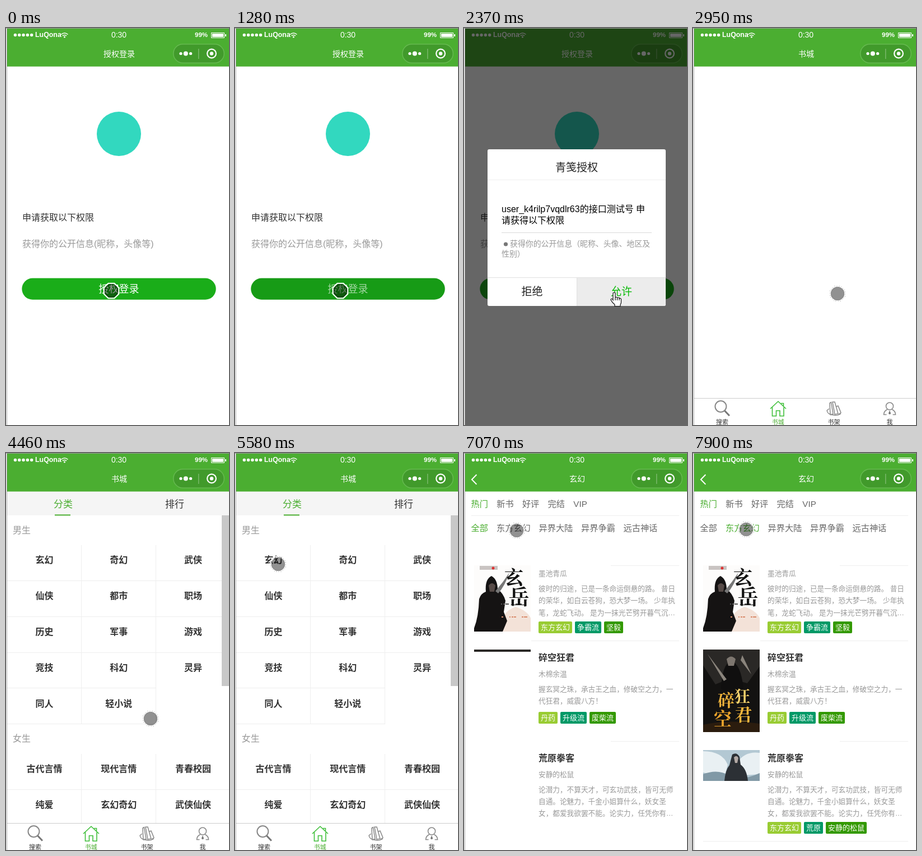
These frames come from a looping animation (398 px wide and 707 px high, 8000 ms). An HTML page with a canvas:

```html
<!DOCTYPE html>
<html lang="zh">
<head>
<meta charset="utf-8">
<style>
html, body { margin: 0; width: 100%; height: 100%; overflow: hidden; background: #fff; }
canvas { display: block; }
</style>
</head>
<body>
<canvas id="stage" width="398" height="707"></canvas>
<script>
const c = document.getElementById('stage').getContext('2d');
const LOOP = 8000;
const GREEN = '#4bae31';
const FONT = '"Liberation Sans", "Noto Sans CJK SC", "Noto Sans CJK", sans-serif';
const BRUSH = '"Noto Serif CJK SC", "Noto Sans CJK SC", "Noto Sans CJK", serif';

// ---- helpers ----
// latest entry of [[time, ...values], ...] that has started
const stepAt = (steps, t) => steps.filter(s => s[0] <= t).pop();

function rect(x, y, w, h, color) {
  c.fillStyle = color;
  c.fillRect(x, y, w, h);
}
function round(x, y, w, h, r, color) {
  c.fillStyle = color;
  c.beginPath();
  c.roundRect(x, y, w, h, r);
  c.fill();
}
function disc(x, y, r, color) {
  c.fillStyle = color;
  c.beginPath();
  c.arc(x, y, r, 0, 7);
  c.fill();
}
function stroke(d, color, width = 1) {
  c.strokeStyle = color;
  c.lineWidth = width;
  c.stroke(new Path2D(d));
}
function fill(d, color) {
  c.fillStyle = color;
  c.fill(new Path2D(d));
}
// y is the middle of the glyphs
function text(s, x, y, size, color, align = 'left', weight = '', family = FONT) {
  c.font = `${weight} ${size}px ${family}`;
  c.textAlign = align;
  c.fillStyle = color;
  c.fillText(s, x, y + size * .37);
}
function clipped(x, y, w, h, draw) {
  c.save();
  c.beginPath();
  c.rect(x, y, w, h);
  c.clip();
  draw();
  c.restore();
}

// ---- navigation bar ----
function navBar(title, back, alpha) {
  rect(2, 1, 396, 67.6, GREEN);
  for (let i = 0; i < 5; i++) disc(16.5 + i * 7.3, 12.5, 2.7, '#fff');
  text('LuQona', 52, 11.5, 12.4, '#fff', 'left', 'bold');
  stroke('M98.5 11.5q6-5 12 0M100.8 14q3.7-3 7.4 0', '#fff', 1.6);
  disc(104.5, 16, 1.5, '#fff');
  text('0:30', 201.5, 12, 14, '#fff', 'center');
  text('99%', 337, 12, 11.5, '#fff', 'left', 'bold');
  stroke('M366.5 8.5h23v9h-23z', '#fff');
  rect(368, 10, 20, 6, '#fff');
  rect(391, 11, 2, 4, '#fff');

  c.globalAlpha = alpha;
  text(title, 202, 46, 14, '#fff', 'center', '500');
  if (back) stroke('M22.5 38.5L14 47.2l8.5 8.7', '#fff', 2);
  c.globalAlpha = 1;

  round(298, 28, 92, 35, 17.5, 'rgba(255,255,255,.15)');
  round(299.5, 29.5, 89, 32, 16, '#419a2b');
  disc(312, 45.5, 2.6, '#fff');
  disc(320.8, 45.5, 4, '#fff');
  disc(329.6, 45.5, 2.6, '#fff');
  rect(343, 37, 1.5, 18, 'rgba(255,255,255,.3)');
  disc(367, 45.5, 9, '#fff');
  disc(367, 45.5, 6.8, '#419a2b');
  disc(367, 45.5, 3.2, '#fff');
}

// ---- login page ----
function loginPage(pressed) {
  disc(201.5, 188.5, 39.5, '#32d8bf');
  text('申请获取以下权限', 29, 337, 16, '#333');
  text('获得你的公开信息(昵称，头像等)', 29, 384.5, 16, '#999');
  round(28.4, 445.6, 346.3, 38.2, 19, pressed ? '#179b16' : '#1aad19');
  text('授权登录', 201.5, 464.5, 18, pressed ? 'rgba(255,255,255,.6)' : '#fff', 'center');
}

function dialog(alpha, allowPressed) {
  c.globalAlpha = alpha;
  rect(2, 1, 396, 706, 'rgba(0,0,0,.6)');
  round(42, 216, 318, 279, 3, '#fff');
  text('青笺授权', 201, 248, 19, '#222', 'center');
  rect(42, 270, 318, 1, '#eee');
  text('user_k4rilp7vqdlr63的接口测试号 申', 67, 322.5, 16, '#000');
  text('请获得以下权限', 67, 342.5, 16, '#000');
  rect(67, 364, 268, 1, '#d9d9d9');
  disc(74.5, 385, 3.6, '#777');
  text('获得你的公开信息（昵称、头像、地区及', 82, 383.5, 13.9, '#999');
  text('性别）', 67, 401.5, 13.9, '#999');
  if (allowPressed) round(201, 444, 159, 51, [0, 0, 3, 0], '#ececec');
  rect(42, 444, 318, 1, '#e0e0e0');
  rect(201, 444, 1, 51, '#e0e0e0');
  text('拒绝', 121.5, 469, 19, '#222', 'center');
  text('允许', 281, 469, 19, '#09bb07', 'center');
  c.globalAlpha = 1;
}

// ---- store page ----
function tabBar(homeLoaded) {
  rect(2, 659, 396, 48, '#fff');
  rect(2, 659, 396, 1, '#ccc');
  stroke('M59.500 674a10 10 0 1 1-20 0 10 10 0 1 1 20 0', '#888', 2);
  stroke('M56.500 681.500l8.500 9', '#777', 3);
  if (homeLoaded) stroke('M138 678l14-13 14 13M141.5 675.5v15.5h7v-9.500h6.500v9.500h7v-15.500M157 668.500h4.500v5', '#3fbf3a', 1.6);
  stroke('M244 668l2.500-1.500 3.500 21-5 1zM249 666h4l6 21-6 1zM256 674l3-1 5 12-4 3M239 681q1 7 10 8M239 681l4-3M249 689q9 2 15-2', '#888', 1.5);
  stroke('M357.500 673.500a6.500 6.500 0 1 1-13 0 6.500 6.500 0 1 1 13 0M346.500 679.500q-6 3-6 9h5M355.500 679.500q6 3 6 9h-5', '#888', 1.6);
  fill('M351 681l2 5a2 2 0 1 1-4 0z', '#777');
  ['搜索', '书城', '书架', '我'].forEach((s, i) =>
    text(s, 52 + i * 99.7, 701.5, 11, i === 1 ? GREEN : '#333', 'center'));
}

function genreGrid(names, top) {
  names.forEach((name, i) => {
    const col = i % 3, x = 2 + col * 132.7, y = top + Math.floor(i / 3) * 63.8;
    text(name, x + 66.5, y + 26.5, 16, '#333', 'center', 'bold');
    if (col < 2) rect(Math.round(x + 132), y, 1, 63.8, '#eee');
    if (col < 2 || i + 3 < names.length) rect(x, Math.round(y + 63), 133, 1, '#eee');
  });
}
const BOYS = '玄幻 奇幻 武侠 仙侠 都市 职场 历史 军事 游戏 竞技 科幻 灵异 同人 轻小说'.split(' ');
const GIRLS = '古代言情 现代言情 青春校园 纯爱 玄幻奇幻 武侠仙侠 科幻 悬疑 同人'.split(' ');

function storePage(t) {
  if (t >= 4190) {
    rect(2, 68, 396, 43, '#f5f5f5');
    text('分类', 102, 90.5, 17, GREEN, 'center');
    text('排行', 301, 90.5, 17, '#333', 'center');
    rect(87, 109.5, 28, 2, GREEN);
    text('男生', 12, 137.5, 16, '#999');
  }
  if (t >= 4460) clipped(2, 111, 396, t < 5890 ? 548 : 535, () => {
    genreGrid(BOYS, 164);
    text('女生', 12, 508.5, 16, '#999');
    genreGrid(GIRLS, 536);
    rect(385, 111, 13, 304, '#c8c8c8');
  });
  if (t < 5890) tabBar(t >= 2950);
}

// ---- book list page ----
function coverInk() {
  rect(18, 200, 101, 118, '#fdfcfb');
  fill('M62 318q4-36 30-44 20 6 27 20v24z', '#f3e2d8');
  fill('M18 318v-6q8-20 9-52 3-10 12-13-2-22 10-28 11 6 11 24 10 6 14 20l-3 20 6 16-8 19z', '#151313');
  fill('M44 236q6-8 12 0l-2 11h-8z', '#574b48');
  fill('M56 246q14-16 25-33-8 24-20 37z', '#777');
  for (let i = 0; i < 14; i++)
    rect(66 + i * 37 % 48, 268 + i * 23 % 46, 2 + i % 3, 2, i % 2 ? '#d98a6a' : '#555');
  rect(28, 201, 32, 7, '#c9c4c2');
  disc(52, 205, 2.5, '#d33');
  text('玄', 89, 221, 34, '#111', 'center', '900', BRUSH);
  text('岳', 98, 256, 37, '#111', 'center', '900', BRUSH);
}
function coverGold() {
  rect(18, 350, 101, 147, '#131211');
  fill('M18 350h101v30l-22 30-32-8-25 10-22-34z', '#2a2826');
  fill('M50 420q2-44 18-50 18 6 22 50l-20 12z', '#100f0f');
  fill('M60 367q8-9 16 0l-3 12h-10z', '#7d766f');
  fill('M26 358l34 45-5 3zM88 360l16 34-19-25z', '#8a847c');
  fill('M18 484q40-10 101-2v15h-101z', '#2b1c0e');
  text('碎', 59, 440, 30, '#f1b53c', 'center', '900', BRUSH);
  text('空', 53, 473, 32, '#e9a32c', 'center', '900', BRUSH);
  text('狂', 88, 434, 28, '#f7d26c', 'center', '900', BRUSH);
  text('君', 90, 466, 31, '#f1b53c', 'center', '900', BRUSH);
}
function coverSky() {
  rect(18, 529, 101, 55, '#b3c8d3');
  fill('M18 531q34 0 44 24l-6 22-38-8zM119 534q-26-4-41 18l12 22 29-2z', '#e9f0f3');
  fill('M18 572q26-10 46 2t55-4v14h-101z', '#8199a6');
  fill('M56 584q2-20 9-28l5-19q8-5 13 4l2 14q11 8 13 29z', '#2c3035');
  fill('M73 542q5-5 8 1l-2 9h-4z', '#b3a9a5');
}

const BOOKS = [
  { author: '墨池青瓜', cover: coverInk, tags: ['东方玄幻', '争霸流', '坚毅'],
    lines: ['彼时的归途，已是一条命运倒悬的路。 昔日', '的荣华，如白云苍狗，恐大梦一场。 少年执', '笔，龙蛇飞动。 是为一抹光芒劈开暮气沉…'] },
  { title: '碎空狂君', author: '木棉余温', cover: coverGold, tags: ['丹药', '升级流', '废柴流'],
    lines: ['握玄冥之珠，承古王之血，修破空之力，一', '代狂君，威震八方！'] },
  { title: '荒原拳客', author: '安静的松鼠', cover: coverSky, tags: ['东方玄幻', '荒原', '安静的松鼠'],
    lines: ['论潜力，不算天才，可玄功武技，皆可无师', '自通。论魅力，千金小姐算什么，妖女圣', '女，都爱我欲罢不能。论实力，任凭你有…'] }
];
const TAG_COLORS = ['#9c3', '#096', '#390'];

function tagRow(tags, y) {
  let x = 133;
  tags.forEach((tag, i) => {
    const w = tag.length * 13 + 8;
    round(x, y - 10.5, w, 21, 2, TAG_COLORS[i]);
    text(tag, x + 4, y, 13, '#fff');
    x += w + 5;
  });
}

function bookList(t) {
  rect(13, 111, 371, 1, '#eee');
  rect(262, 200, 122, 1, '#eee');
  rect(120, 334, 264, 1, '#eee');
  rect(262, 513, 122, 1, '#eee');
  if (t >= 7220) rect(18, 691, 366, 1, '#eee');
  BOOKS.forEach((book, i) => {
    const y = i * 178.7;
    if (book.title) text(book.title, 133, 185.5 + y, 16, '#333', 'left', 'bold');
    text(book.author, 133, 214.5 + y, 12.67, '#999');
    book.lines.forEach((line, n) => text(line, 133, 241.5 + y + n * 21.2, 12.67, '#999'));
    // two-line blurbs leave a little more room above the tags
    const tagY = book.lines.length < 3 ? 291.8 : 309.6;
    if (i < 2 || t >= 7220) tagRow(book.tags, Math.round(tagY + y) + .5);
  });
  // covers arrive from the top down
  const loaded = stepAt([[0, 0], [6920, 354], [7220, 497], [7900, 584]], t)[1];
  clipped(18, 200, 101, Math.max(0, loaded - 200), () => BOOKS.forEach(b => b.cover()));
}

function listPage(t) {
  rect(2, 68, 396, 639, '#fff');
  const picked = t >= 7750 ? 1 : 0;
  ['热门', '新书', '好评', '完结', 'VIP'].forEach((s, i) =>
    text(s, 12.5 + i * 45.7, 90, 15.2, i ? '#666' : GREEN));
  ['全部', '东方玄幻', '异界大陆', '异界争霸', '远古神话'].forEach((s, i) =>
    text(s, i ? 58 + (i - 1) * 75.5 : 12.5, 133.5, 15.2, i === picked ? GREEN : '#666'));
  if (t >= 6660) bookList(t);
}

// ---- pointer ----
const POINTER = [
  [0, 188, 468], [1950, 197, 467], [2100, 237, 471], [2250, 268, 471], [2800, 263, 471],
  [2950, 258, 473], [4890, 233, 416], [5040, 160, 320], [5160, 107, 253], [5310, 97, 218],
  [5460, 82, 205], [5580, 77, 198], [6920, 90, 151], [7070, 94, 138], [7220, 95, 136]
];
function pointer(t) {
  const [, x, y] = stepAt(POINTER, t);
  c.save();
  c.translate(x, y);
  if (t >= 1430 && t < 2950) {
    const hand = 'M-2 2q0-2 2-2t2 2v7q1-1 2.500-.5 1 .3 1.500 1 1.500-1 3 0l1 1q2.500-.3 2.500 2v5q0 2-1.500 4v3h-10v-3q-5-4-7-8.500 0-2 1.500-2 1.500.5 2.500 2.500z';
    fill(hand, '#fff');
    stroke(hand + 'M2 9v5M5.500 9.500v4.500M9 10v4', '#111', 1.2);
  } else {
    const octagon = 'M-5.500-13.300h11l7.800 7.800v11l-7.800 7.800h-11l-7.800-7.800v-11z';
    disc(0, 0, 12, 'rgba(0,0,0,.43)');
    stroke('M11.500 0a11.500 11.500 0 1 1-23 0 11.500 11.500 0 1 1 23 0', t < 1430 ? '#0b2a0b' : '#888', 1.2);
    stroke(octagon, '#fff', 2);
    if (t >= 1430) {
      c.setLineDash([1, 3]);
      stroke(octagon, '#888');
    }
  }
  c.restore();
}

function draw(t) {
  rect(0, 0, 398, 707, '#fff');
  rect(0, 0, 398, 1, '#999');
  const slide = stepAt([[0, 1], [5890, .5], [6170, .15], [6290, .04], [6410, 0]], t)[1];
  if (t < 2800) loginPage(t >= 1280 && t < 1430);
  else if (t < 6410) storePage(t);
  if (t >= 5890) {
    c.save();
    c.translate(Math.round(slide * 396), 0);
    listPage(t);
    c.restore();
  }
  navBar(t < 2800 ? '授权登录' : t < 5890 ? '书城' : '玄幻', t >= 5890, t < 5890 ? 1 : 1 - slide);
  if (t >= 1430 && t < 2520) dialog(t < 1550 ? .6 : 1, t >= 2250);
  pointer(t);
  rect(1, 0, 1, 707, '#a9a9a9');
}

function tick() {
  draw(performance.now() % LOOP);
  requestAnimationFrame(tick);
}
tick();
</script>
</body>
</html>
```
